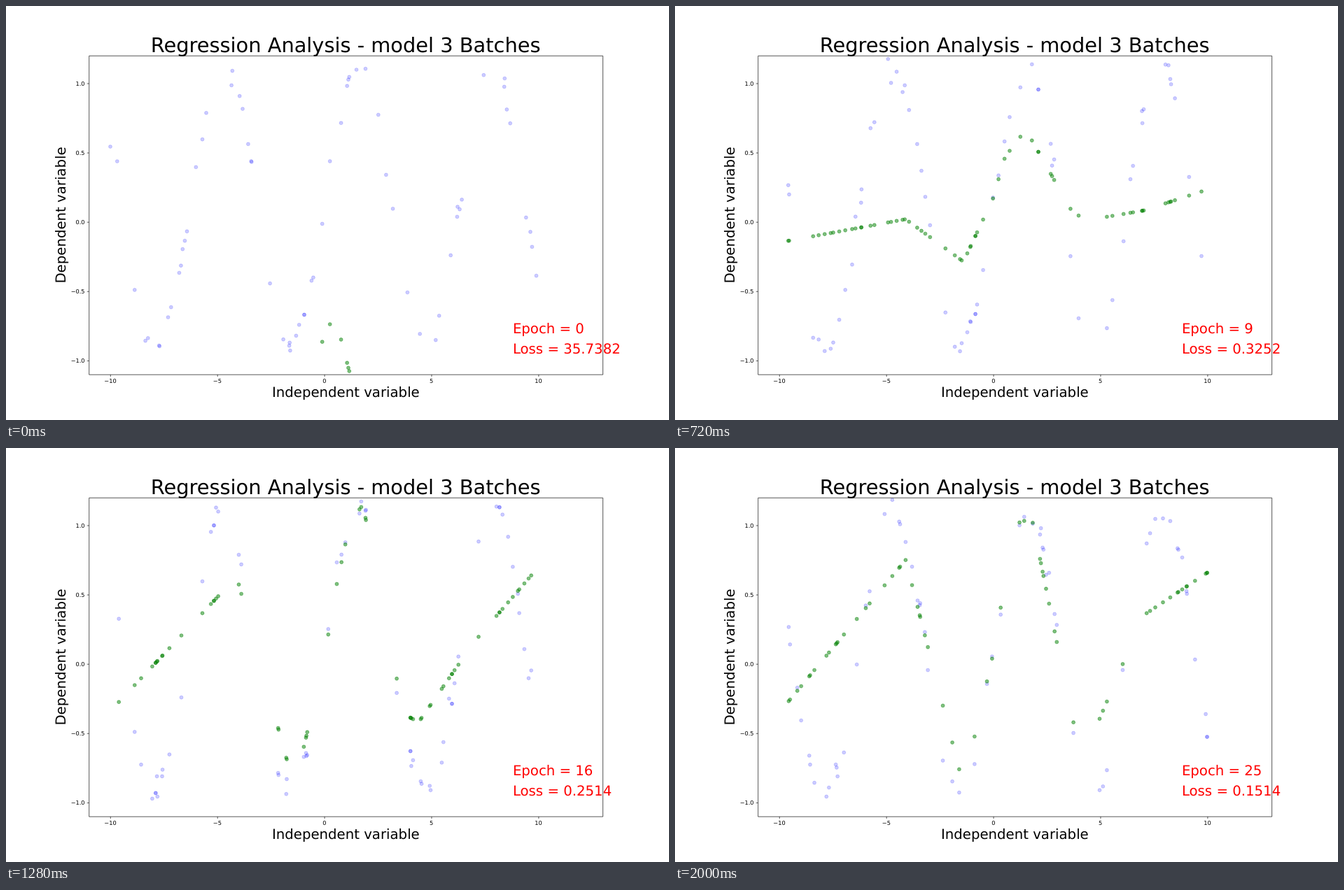
Write an HTML page that moves like this. It is 947 px wide and 592 px high and loops after 2.08 s.

```html
<!DOCTYPE html>
<html lang="en">
<head>
<meta charset="utf-8">
<title>Regression Analysis</title>
<style>
  html, body { margin: 0; width: 100%; height: 100%; overflow: hidden; background: #fff; }
  svg { display: block; font-family: "DejaVu Sans", Verdana, sans-serif; font-size: 19.73px;
        text-rendering: geometricPrecision; }
  circle { stroke-width: .82px; }
  .data circle { fill: blue; stroke: blue; fill-opacity: .2; stroke-opacity: .2; }
  .fit circle { fill: green; stroke: green; fill-opacity: .5; stroke-opacity: .5; }
  .axes path { fill: none; stroke: #000; stroke-width: .66px; }
  .axes text { font-size: 8.22px; }
  .mid { text-anchor: middle; }
</style>
</head>
<body>
<svg width="947" height="592" viewBox="0 0 947 592">
  <clipPath id="plot"><rect x="118.4" y="71" width="733.9" height="455.9"/></clipPath>
  <g clip-path="url(#plot)"><g class="data"></g><g class="fit"></g></g>
  <g class="axes"></g>
  <g class="mid">
    <text x="485.1" y="66.4" font-size="28.85">Regression Analysis - model 3 Batches</text>
    <text x="485.35" y="559.4">Independent variable</text>
    <text transform="translate(84.8 299) rotate(-90)">Dependent variable</text>
  </g>
  <g fill="red">
    <text id="epoch" x="723.9" y="467.8"></text>
    <text id="loss" x="723.9" y="497.4"></text>
  </g>
</svg>
<script>
const STEP = 80, EPOCHS = 26, BATCH = 64, SAMPLES = 1000;
const $ = s => document.querySelector(s);
const px = x => 118.4 + (x + 11) * 30.58;
const py = y => 526.9 - (y + 1.1) * 198.2;
const mix = (a, b, u) => a + (b - a) * u;
const rand = n => { const v = Math.sin(n * 12.9898) * 43758.5453; return v - Math.floor(v); };

// Bends of the fitted curve, and its heights there as training goes on.
const bends = [-10, -4.1, -1.4, 0, .5, 1.2, 1.8, 3.7, 4.4, 7, 10];
const states = [
  { epoch: 0, loss: 35.7382, heights: [-9, -5, -1.7, -.8, -.68, -1.1, -1.8, -3, -3, -5, -9] },
  { epoch: 3, loss: .4575, heights: [-.09, -.01, .01, .13, .18, .19, .18, .21, .23, .33, .45] },
  { epoch: 7, loss: .3431, heights: [-.28, -.08, -.11, .24, .38, .47, .4, .18, .13, .15, .23] },
  { epoch: 12, loss: .3002, heights: [.05, .17, -.55, .08, .56, .84, .87, -.1, -.16, -.02, .24] },
  { epoch: 16, loss: .2514, heights: [-.34, .63, -.89, .04, .52, 1.02, 1.15, -.36, -.42, .16, .7] },
  { epoch: 22, loss: .203, heights: [-.74, .59, -.85, .04, .48, .88, 1, -.47, -.69, .02, .34] },
  { epoch: 25, loss: .1514, heights: [-.35, .75, -.88, .08, .56, 1.02, 1.05, -.41, -.6, .35, .66] },
];

function curve(heights, x) {
  const i = Math.max(1, bends.findIndex(b => b >= x));
  return mix(heights[i - 1], heights[i], (x - bends[i - 1]) / (bends[i] - bends[i - 1]));
}

// A noisy sine, sampled in a new random batch each epoch.
const sample = k => {
  const x = mix(-10, 10, k / SAMPLES);
  return { x, y: Math.sin(x) + .2 * rand(k) };
};
const batch = epoch => Array.from({ length: BATCH }, (_, i) =>
  sample(Math.floor(SAMPLES * rand(epoch * 97 + i + 1))));

const dots = points => points.map(({ x, y }) =>
  `<circle cx="${px(x).toFixed(1)}" cy="${py(y).toFixed(1)}" r="2.47"/>`).join("");

function draw(epoch) {
  const i = Math.max(1, states.findIndex(s => s.epoch >= epoch));
  const a = states[i - 1], b = states[i];
  let u = (epoch - a.epoch) / (b.epoch - a.epoch);
  if (i === 1) u = 1 - (1 - u) ** 4; // steep first descent
  const heights = a.heights.map((h, k) => mix(h, b.heights[k], u));
  const data = batch(epoch);
  $(".data").innerHTML = dots(data);
  $(".fit").innerHTML = dots(data.map(({ x }) => ({ x, y: curve(heights, x) })));
  $("#epoch").textContent = `Epoch = ${epoch}`;
  $("#loss").textContent = `Loss = ${(a.loss * (b.loss / a.loss) ** u).toFixed(4)}`;
}

function drawAxes() {
  let path = "M118.4 71.04H852.3V526.9H118.4Z", labels = "";
  const label = (x, y, anchor, text) =>
    labels += `<text x="${x}" y="${y}" text-anchor="${anchor}">${text.replace("-", "\u2212")}</text>`;
  for (let v = -10; v <= 10; v += 5) {
    path += `M${px(v)} 526.9v2.88`;
    label(px(v), 538.9, "middle", String(v));
  }
  for (let v = -1; v <= 1; v += .5) {
    path += `M118.4 ${py(v)}h-2.88`;
    label(112.6, py(v) + 3.1, "end", v.toFixed(1));
  }
  $(".axes").innerHTML = `<path d="${path}" transform="translate(.3 .3)"/>${labels}`;
}

let shown = -1;
function tick() {
  const epoch = Math.floor(performance.now() / STEP) % EPOCHS;
  if (epoch !== shown) draw(shown = epoch);
  requestAnimationFrame(tick);
}
drawAxes();
tick();
</script>
</body>
</html>
```
